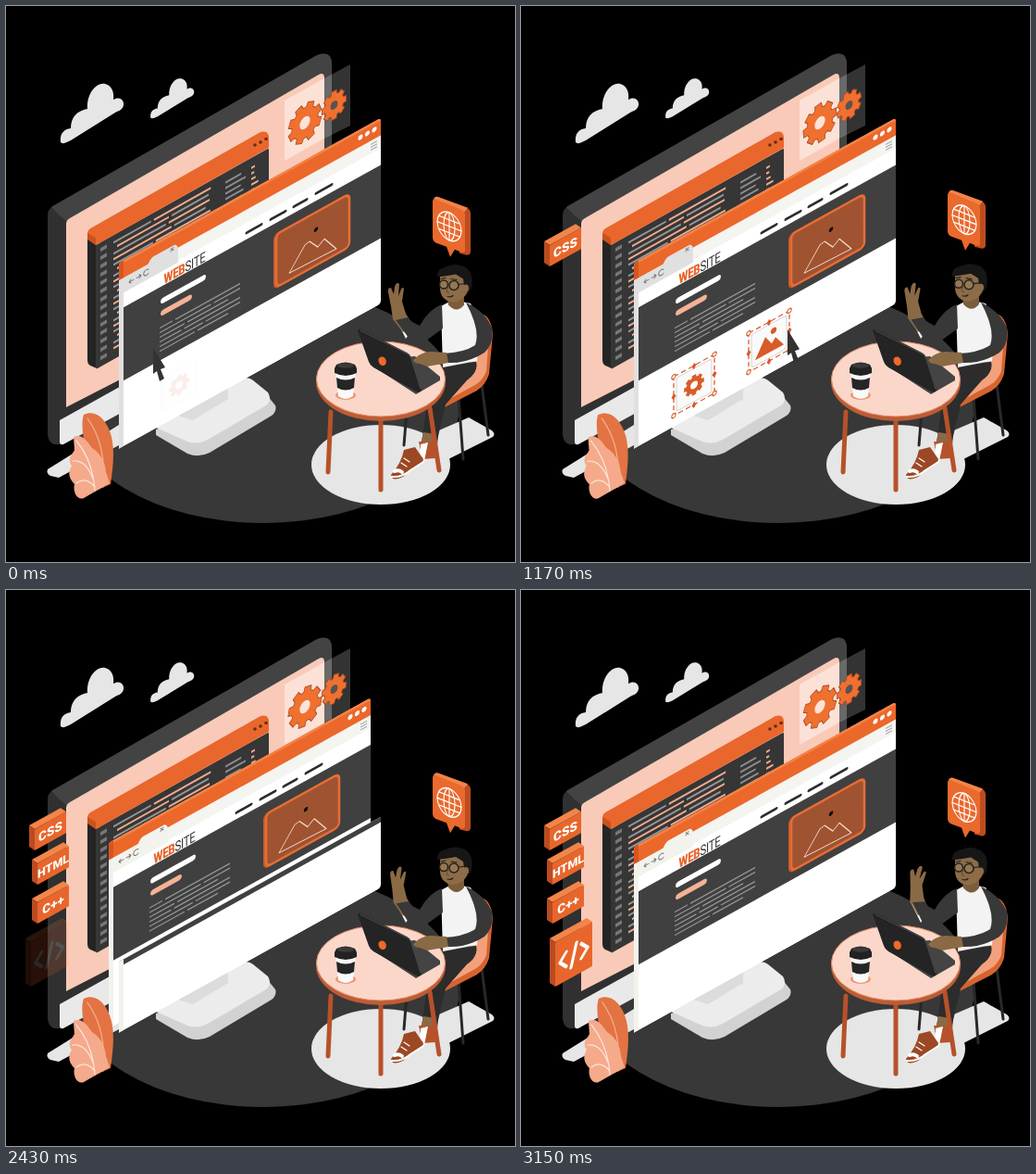
These frames come from a looping animation (550x600 px, 3.18 s). An HTML page:

```html
<!DOCTYPE html>
<html lang="en">
<head>
<meta charset="utf-8">
<title>Website building</title>
<style>
html,body{margin:0;width:100%;height:100%;overflow:hidden;background:#000}
svg{display:block;width:100vw;height:100vh;--bar:#e0e0e0}
text{font-family:Roboto,Inter,sans-serif}
.line{fill:none;stroke-linecap:round;stroke-linejoin:round}
</style>
</head>
<body>
<svg viewBox="0 0 550 600" xmlns="http://www.w3.org/2000/svg">
<defs>
  <path id="cloud" fill="#e6e6e6" d="M59 147C58 137 63 133 70 132C70 120 77 113 88 111C87 94 98 82 107 84C115 86 117 94 116 101C122 97 128 101 127 107C126 112 122 113 118 115L70 145Q61 150 59 147Z"/>
  <clipPath id="frame"><path d="M0 4Q0 0 4 0H279Q283 0 283 4V197Q283 201 279 201H0Z"/></clipPath>
  <clipPath id="reveal"><rect id="shade" x="-2" y="201" width="290" height="210"/></clipPath>
  <clipPath id="code"><rect width="187" height="134"/></clipPath>
  <g id="win" clip-path="url(#frame)">
    <rect width="283" height="201" fill="#fff"/>
    <rect y="17" width="283" height="16" fill="#f4f4f1"/>
    <rect y="17" width="62" height="18" fill="var(--bar)"/>
    <rect width="283" height="19" fill="#ec672a"/>
    <rect width="283" height="3" fill="#f58244"/>
    <path fill="var(--bar)" d="M5 21H31Q33 15 37 14H60Q63 15 64 20V35H5Z"/>
    <path class="line" stroke="#777" d="M56 16l3 3m0-3l-3 3M16 27h-5m2-2l-2 2 2 2M19 27h5m-2-2l2 2-2 2M32 25a3 3 0 1 0 0 4"/>
    <g fill="#fff"><circle cx="261" cy="9" r="2.6"/><circle cx="268.500" cy="9" r="2.600"/><circle cx="276" cy="9" r="2.600"/></g>
    <path stroke="#999" d="M272 23h7m-7 3h7m-7 3h7"/>
    <rect y="51" width="283" height="79" fill="#404040"/>
    <path class="line" stroke="#2b2b2b" stroke-width="3" d="M138 44h16M164 44h16M189 44h14M213 43h17"/>
    <text transform="matrix(.76 0 0 1 48.500 50)" font-size="15" letter-spacing="-.3" font-weight="900" fill="#e8632a">WEB<tspan font-weight="400" fill="#333">SITE</tspan></text>
    <path class="line" stroke="#fff" stroke-width="6" d="M48 67h43"/>
    <path class="line" stroke="#f4b295" stroke-width="6" d="M48 80h28"/>
    <g id="copy" stroke="#969696" stroke-width="1.400"></g>
    <rect x="167" y="62" width="83" height="60" rx="6" fill="#c85b2b"/>
    <rect x="170" y="63.500" width="79" height="57" rx="5" fill="#9f5331" stroke="#e86d36" stroke-width="2.500"/>
    <path class="line" stroke="#f8dccf" d="M184 113L201 92 206 91 215 102 222 97 235 115Z"/>
    <circle cx="213" cy="82" r="2.800" fill="#111" stroke="#d9683a" stroke-width=".6"/>
    <rect y="19" width="5" height="182" fill="var(--bar)"/>
    <rect width="5" height="19" fill="#d6561f"/>
  </g>
</defs>
<rect width="550" height="600"/>
<ellipse cx="278" cy="430" rx="212" ry="128" fill="#383838"/>
<use href="#cloud"/>
<use href="#cloud" transform="translate(115.500 22) scale(.69 .67)"/>

<!-- monitor -->
<path fill="#e6e6e6" d="M45 500Q43 504 48 507L57 509L122 474V452Z"/>
<path fill="#d2d2d2" d="M162 457V463L196 483Q208 488 220 482L287 442Q293 437 291 431L282 420Z"/>
<path fill="#ececec" d="M162 455L256 402Q262 400 267 404L283 417Q288 425 281 431L218 468Q207 474 196 470Z"/>
<path fill="#dcdcdc" d="M186 442L240 410V424L202 447Z"/>
<path fill="#303030" d="M45 226Q45 219 52 215L335 54Q350 47 352 60V270L62 472Q47 477 45 463Z"/>
<path fill="#434343" d="M49 217L336 53Q350 48 352 60V300L343 300V72L65 232L58 226Z"/>
<path fill="#f9cab8" d="M65 235Q65 231 69 229L338 74Q344 71 344 78V290L65 433Z"/>
<path fill="#e9e9e9" d="M58 447L130 407V436L62 473Q58 474 58 470Z"/>

<!-- code window -->
<path fill="#242424" d="M88 246L98 255V391L91 388Q88 386 88 382Z"/>
<g transform="matrix(1 -.56 0 1 97 258)">
  <rect width="187" height="134" rx="2" fill="#363636"/>
  <g id="lines" clip-path="url(#code)" stroke-width="2.200" fill="none"></g>
</g>
<path fill="#e9672c" d="M88 246Q88 241 93 239L275 136Q283 134 284 141V153L97 258L89 251Z"/>
<path fill="#c9521f" d="M88 245L97 250V258L88 252Z"/>
<g fill="#632c18"><circle cx="269" cy="150" r="1.800"/><circle cx="275" cy="147" r="1.800"/><circle cx="281" cy="143.500" r="1.800"/></g>

<!-- gears -->
<path fill="#fff" fill-opacity=".42" d="M301 102L344 78V143L301 167Z"/>
<path fill="#fff" fill-opacity=".2" d="M344 78L372 63V129L344 143Z"/>
<g transform="matrix(.866 -.5 0 1 323 126)"><path id="gearA"/><circle r="6.500" fill="#fbe3d8"/></g>
<g transform="matrix(.866 -.5 0 1 354.500 107)"><path id="gearB"/><circle r="4.500" fill="#5a5450"/></g>

<!-- browser -->
<g id="old">
  <g transform="matrix(1 -.553 0 1 122 277)"><use href="#win"/></g>
  <g id="icons"></g>
  <path id="cursor" fill="#333" d="M0 0L13 21 8 23 12 33 7 36 4 25 0 28Z"/>
</g>
<g transform="matrix(1 -.553 0 1 122 277)"><g clip-path="url(#reveal)"><use href="#win"/></g></g>

<g id="tags"></g>

<!-- plant -->
<g id="plant">
  <path fill="#e37343" d="M84 441C97 435 109 446 114 465C118 482 115 502 113 516L92 525C96 500 77 462 84 441Z"/>
  <path class="line" stroke="#f4b294" stroke-width="1.200" d="M88 445Q109 474 105 519"/>
  <path fill="#f5aa8b" d="M73 465C82 461 88 470 93 477C101 482 107 490 108 503L112 515L84 531C77 534 72 524 74 516C65 507 69 500 71 496C65 488 73 483 74 479Z"/>
  <path class="line" stroke="#fde5db" stroke-width="1.200" d="M76 469Q94 491 96 523M72 491Q86 489 94 510M76 515Q86 507 96 519"/>
</g>

<!-- desk scene -->
<path fill="#e6e6e6" d="M462 497L526 465Q530 461 523 457L500 444L440 470Z"/>
<ellipse cx="405" cy="495" rx="75" ry="43" fill="#e6e6e6"/>
<path class="line" stroke="#282828" stroke-width="3" d="M433 437L430 474M514 408L521 463M489 422L494 489M468 430L464 480"/>
<path fill="#d5642f" d="M512 332Q524 333 526 354L522 397Q518 410 507 416L472 434Q464 435 462 428L507 399Z"/>
<path fill="#f3a17d" d="M511 334Q521 337 522 354L519 394Q515 405 505 410L470 429L462 422L500 394Z"/>
<path fill="#2c2c2c" d="M471 386L508 384Q511 395 498 404L475 430L464 477L449 473L455 428Z"/>
<path fill="#8a6a45" d="M451 460L464 462 462 476 447 477Z"/>
<path fill="#b5522a" d="M446 470L462 471Q467 479 464 488L450 489Z"/>
<path fill="#fff" d="M448 473L456 471 452 491 447 490Z"/>
<path fill="#9c4824" d="M430 479L442 476 451 489Q451 495 442 497L429 508Q417 514 416 506Q427 494 430 479Z"/>
<path class="line" stroke="#fff" stroke-width="2" d="M417 508Q428 509 437 501L451 492"/>
<path class="line" stroke="#fff" stroke-width="1.200" d="M430 488l6 4M427 493l6 4"/>
<path class="line" stroke="#fff" stroke-width="4" d="M420 502Q424 500 428 503"/>

<path fill="#f3f3f3" d="M470 324L483 317 502 321Q514 344 509 383L472 390Z"/>
<path fill="#f3f3f3" d="M420 335L432 359 437 352Z"/>
<path fill="#383838" d="M471 322Q457 327 447 345L439 341 431 349 438 360Q446 366 454 361L472 348Z"/>
<g id="arm">
  <path fill="#8a6a45" d="M418 338L429 352 440 345 432 332 428 319 430 305Q428 302 426 308L424 313 425 300Q422 297 420 303L419 311 416 304Q412 304 413 309L416 324Z"/>
  <path fill="#383838" d="M421 339L435 358 447 349 434 336Z"/>
</g>
<g id="head">
  <path fill="#7b5d3b" d="M476 308H495V321Q487 331 478 321Z"/>
  <path fill="#8d6c47" d="M469 289Q480 281 499 289V307Q493 318 482 318Q470 316 469 304Z"/>
  <path fill="#171717" d="M466 291Q465 282 475 280Q485 275 496 280Q506 286 503 302Q501 309 496 306L494 293 486 288Q476 290 466 291Z"/>
  <ellipse cx="497" cy="303" rx="3" ry="4" fill="#8d6c47"/>
  <g fill="#c3a783" fill-opacity=".2" stroke="#222" stroke-width="1.500"><circle cx="473" cy="299" r="4.500"/><circle cx="484" cy="300" r="5"/></g>
  <path class="line" stroke="#222" stroke-width="1.200" d="M489 299L497 298M470 293l5-1M481 293l6 1M477 312q4 1 6-1"/>
  <path class="line" stroke="#684b2e" d="M478 301l-2 6 3 1"/>
</g>
<g class="line" stroke="#b75129" stroke-width="5"><path d="M351 438L348 503M405 446V522M458 434L468 501"/></g>
<ellipse cx="405" cy="406" rx="70" ry="42" fill="#bd5c34"/>
<ellipse cx="405" cy="402.500" rx="69.500" ry="40.500" fill="#fbd7ca" stroke="#e08a62"/>

<ellipse cx="367" cy="420" rx="11" ry="5" fill="#ed9672"/>
<path fill="#fafafa" d="M356 393H378L375 421Q367 427 359 421Z"/>
<path fill="#262626" d="M357 401Q367 406 377 401L376 412Q367 417 358 412Z"/>
<path fill="#222" d="M355 391L357 387Q367 382 377 387L379 391V396Q367 402 355 396Z"/>
<ellipse cx="367" cy="388" rx="9" ry="2.800" fill="#3a3a3a"/>

<path fill="#444" d="M396 382L442 378 469 400V404L443 419 394 387Z"/>
<path fill="#242424" d="M380 350Q381 347 386 350L433 374Q437 376 438 380L449 414Q448 418 443 416L397 390Q393 387 392 384Z"/>
<path class="line" stroke="#505050" d="M383 350L433 375Q437 377 438 381L448 413"/>
<ellipse cx="406.500" cy="383.500" rx="4" ry="5" transform="rotate(-25 406 383)" fill="#ef692a"/>
<path fill="#383838" d="M497 320Q517 329 525 347Q528 363 517 374Q498 386 477 385L473 375Q495 374 507 366Q513 350 497 320Z"/>
<path fill="#8a6a45" d="M476 374L458 373Q447 374 440 382Q441 386 447 386L455 389 478 385Z"/>

<!-- speech bubble -->
<g id="bubble">
  <path fill="#bd4d20" d="M466 199L498 211Q502 213 502 217V258Q502 262 498 262L490 260V217Z"/>
  <path fill="#f18449" d="M462 203Q462 199 466 199L499 211 494 217Z"/>
  <path fill="#ea692d" d="M461 204Q461 201 465 202L492 213Q496 215 496 219V256Q496 260 492 259L485 256 480 264 476 253 465 249Q461 247 461 243Z"/>
  <g transform="matrix(.86 .34 0 1 479 231)" class="line" stroke="#fff" stroke-width="1.300"><circle r="15"/><ellipse rx="7" ry="15"/><path d="M0-15V15M-15 0H15M-13-7H13M-13 7H13"/></g>
</g>
</svg>
<script>
const LOOP = 3180, STEP = 30;
const $ = id => document.getElementById(id);
const set = (id, attrs) => { for (const k in attrs) $(id).setAttribute(k, attrs[k]); };
const clamp = x => Math.max(0, Math.min(1, x));
const ease = x => x * x * (3 - 2 * x);
let seed = 7;
const rand = () => (seed = seed * 16807 % 2147483647) / 2147483647;

function gear(r, teeth = 8) {
  const pts = [], step = Math.PI * 2 / teeth;
  for (let i = 0; i < teeth; i++)
    for (const [k, q] of [[-.36, .78], [-.25, 1], [.25, 1], [.36, .78]]) {
      const a = (i + k) * step;
      pts.push((Math.cos(a) * r * q).toFixed(2) + ' ' + (Math.sin(a) * r * q).toFixed(2));
    }
  return 'M' + pts.join('L') + 'Z';
}
const gearStyle = { fill: '#f07030', stroke: '#a64a23', 'stroke-width': .9, 'stroke-linejoin': 'round' };
set('gearA', { d: gear(21), ...gearStyle });
set('gearB', { d: gear(15.5), ...gearStyle });

// text rows
let rows = '';
for (let i = 0; i < 6; i++) {
  const gap = 58 + rand() * 45;
  rows += `<path d="M44 ${95 + i * 5}H${gap}m3 0H${i % 3 == 2 ? 118 : 131}"/>`;
}
$('copy').innerHTML = rows;

rows = '';
for (let i = 0; i < 14; i++) rows += `<path stroke="#777" stroke-width="4" d="M5 ${8 + i * 9}h7"/>`;
for (let i = 0; i < 20; i++) {
  const y = 8 + i * 6, x = 19 + (i % 4 == 1 ? 4 : 0), mid = 45 + rand() * 45;
  const tint = ['#969696', '#efaa8d'];
  rows += `<path stroke="${tint[i % 2]}" d="M${x} ${y}H${mid}"/><path stroke="${tint[(i + 1) % 2]}" d="M${mid + 3} ${y}H${116 + rand() * 11}"/>`;
}
for (let i = 0; i < 7; i++)
  rows += `<path stroke="#8c8c8c" d="M140 ${11 + i * 6}H${153 + rand() * 10}"/><path stroke="#efaa8d" d="M168 ${11 + i * 6}h${3 + rand() * 5}"/>`;
$('lines').innerHTML = rows;

// page widgets
const orange = '#d95b28';
const art = [
  `<path d="${gear(11)}" fill="${orange}"/><circle r="4" fill="#fff"/>`,
  `<path d="M-15 12L-4-7 3 4 7-1 16 12Z" fill="${orange}"/><circle cx="5" cy="-9" r="3.200" fill="${orange}"/>`,
  `<circle r="10" fill="${orange}"/><path d="M-3-5.500L6 0-3 5.500Z" fill="#fff"/>`
];
const spots = [[187, 409], [268, 362], [348, 316]];
const corners = [[-22, -21], [22, -21], [22, 21], [-22, 21]];
const mids = [[0, -21], [22, 0], [0, 21], [-22, 0]];
$('icons').innerHTML = spots.map(([x, y], i) => `<g transform="matrix(1 -.553 0 1 ${x} ${y})">
  <g id="card${i}"><rect x="-19" y="-18" width="38" height="36" rx="3" fill="#fafafa" stroke="#d4d4d4"/>${art[i]}</g>
  <g id="sel${i}"><rect x="-22" y="-21" width="44" height="42" fill="none" stroke="${orange}" stroke-width="1.300" stroke-dasharray="5 3"/>
  ${corners.map(([a, b]) => `<circle cx="${a}" cy="${b}" r="2.200" fill="#fff" stroke="${orange}" stroke-width="1.200"/>`).join('')}
  ${mids.map(([a, b]) => `<path d="M${a - 2.5} ${b + .5}l2.500-3.500 2.500 3.500-2.500 3.500Z" fill="${orange}"/>`).join('')}</g></g>`).join('');

// label blocks: text, x, y, width, height, start
const tags = [
  ['CSS', 25, 258, 34, 23, 860],
  ['HTML', 28, 295, 34, 23, 1300],
  ['C++', 28, 337, 34, 23, 1800],
  ['', 31, 380, 40, 48, 2390]
];
$('tags').innerHTML = tags.map(([label, x, y, w, h], i) => {
  const mark = label
    ? `<text x="${w / 2}" y="${h / 2 + 5}" text-anchor="middle" font-size="${label.length > 3 ? 12.5 : 13.5}" font-weight="800" fill="#fff">${label}</text>`
    : `<path class="line" stroke="#fff" stroke-width="3.400" d="M12 17L5 25 12 33M28 17L35 25 28 33M23 13L17 37"/>`;
  return `<g id="tag${i}"><g transform="translate(${x} ${y})">
  <path fill="#f28549" d="M0-4L${w}${-4 - w * .55}l6 4L6 0Z"/><path fill="#b94b20" d="M0-4L6 0V${h}l-6-4Z"/>
  <g transform="matrix(1 -.55 0 1 6 0)"><rect width="${w}" height="${h}" rx="1" fill="#e8662b"/>${mark}</g></g></g>`;
}).join('');

function track(table, t) {
  const n = table.findIndex(k => k[0] > t);
  if (n < 0) return table[table.length - 1].slice(1);
  if (n == 0) return table[0].slice(1);
  const a = table[n - 1], b = table[n], p = ease((t - a[0]) / (b[0] - a[0]));
  return a.slice(1).map((v, i) => v + (b[i + 1] - v) * p);
}
const pointer = [[0, 159, 369], [420, 209, 406], [640, 209, 406], [860, 241, 324], [1130, 288, 349],
  [1330, 288, 352], [1540, 321, 280], [1860, 368, 311]];
const wave = [[0, 0], [570, 2], [1170, 2], [2100, 4], [2430, 3], [2850, 10]];
const sink = [[0, 1.5], [570, 0], [1500, 1], [2430, 0], [3150, .5]];
const leave = [[2230, 0, 0, 1], [2630, -22, -9, 1], [3120, -30, -13, 0]];
const cards = [[-100, 420], [700, 1040], [1480, 1830]];
const wipeStart = 2250, wipeEnd = 2730;

function draw(t) {
  const [cx, cy] = track(pointer, t);
  set('cursor', { transform: `translate(${cx} ${cy})` });
  cards.forEach(([a, b], i) => {
    const p = clamp((t - a) / (b - a));
    set('card' + i, { opacity: ease(p) });
    set('sel' + i, { opacity: clamp(p * 2 - 1) });
  });
  const [ox, oy, fade] = track(leave, t);
  set('old', { transform: `translate(${ox} ${oy})`, opacity: fade });
  const y = 201 - 205 * clamp((t - wipeStart) / (wipeEnd - wipeStart));
  set('shade', { y, height: 203 - y, visibility: t < wipeStart ? 'hidden' : 'visible' });
  document.querySelector('svg').style.setProperty('--bar', t < wipeStart ? '#e0e0e0' : '#f3f3ee');
  tags.forEach((tag, i) => {
    const p = clamp((t - tag[5]) / 250);
    set('tag' + i, { opacity: p, transform: `translate(${-11 * (1 - ease(p))} 0)` });
  });
  const turn = t / LOOP * 45;
  set('gearA', { transform: `rotate(${turn + 22})` });
  set('gearB', { transform: `rotate(${-turn})` });
  set('bubble', { transform: `translate(0 ${2 + 4.8 * Math.cos(t / 1750 * Math.PI * 2)})` });
  set('arm', { transform: `rotate(${track(wave, t)[0]} 434 350)` });
  set('head', { transform: `translate(0 ${track(sink, t)[0]})` });
  set('plant', { transform: `rotate(${.5 * Math.sin(t / LOOP * Math.PI * 4)} 98 528)` });
}

const start = performance.now();
function tick() {
  const t = (performance.now() - start) % LOOP;
  draw(Math.floor(t / STEP) * STEP);
  requestAnimationFrame(tick);
}
tick();
</script>
</body>
</html>
```
